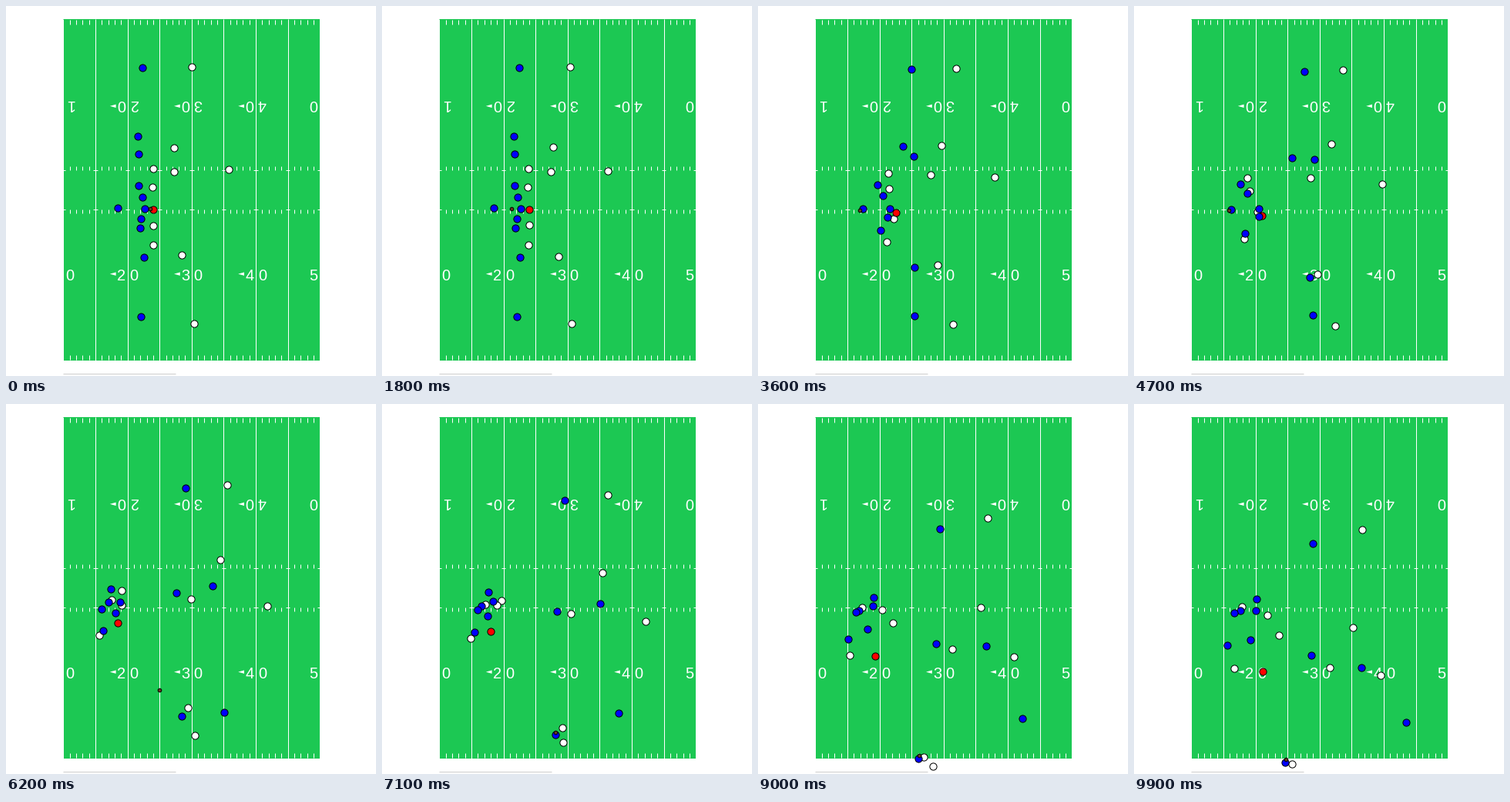
Animation of 480 by 480 pixels, one loop 10000 ms. Source, as a matplotlib script:

```python
import numpy as np
import matplotlib.pyplot as plt
from matplotlib.animation import FuncAnimation
from matplotlib.patches import Polygon, Rectangle

FRAMES, STEP = 100, 100
PT = 0.9                       # points per pixel at 80 dpi
LEFT, RIGHT, TOP, BOTTOM = 74.4, 407.2, 17, 460
YARD = (RIGHT - LEFT) / 40
SNAP, TAKEN, BREAK, THROW, CATCH, MID, END = 1.6, 2.1, 4.7, 5.4, 6.5, 7.2, 9.9

# Key points of each run: line-up, BREAK, MID, END
OFFENSE = np.array([
    [(177, 79.5), (221, 84.5), (237, 127), (231.5, 180.5)],
    [(171, 168.5), (204.5, 196.5), (227.5, 272), (229.5, 325.5)],
    [(171.5, 192), (233.5, 199), (284, 262), (295, 342)],
    [(172, 233), (138, 230.5), (138, 244.5), (159, 252.5)],
    [(176.5, 248), (147, 243), (129, 263), (137.5, 267.5)],
    [(180, 262.5), (161.5, 262.5), (144, 256), (157.5, 267.5)],
    [(175, 276), (161.5, 272.5), (137, 275.5), (151, 305.5)],
    [(173.5, 288), (143.5, 295), (119, 296), (120.5, 312.5)],
    [(174.5, 403), (232, 400.5), (309.5, 401.5), (352.5, 412.5)],
    [(145, 262), (126, 263.5), (124, 267.5), (130, 271)],      # passer
    [(178.5, 325.5), (227.5, 352), (224, 431.5), (196, 464.5)],  # catcher
])
BACKS = np.array([
    [(240.5, 78.5), (271, 83), (294, 120), (296, 163)],
    [(217.5, 183.5), (255.5, 178.5), (287, 221.5), (283.5, 289.5)],
    [(217.5, 214.5), (229, 223), (245.5, 274.5), (253.5, 341.5)],
    [(289, 212), (322, 230.5), (342, 284), (319.5, 352)],
    [(228, 322.5), (238, 347.5), (233.5, 423), (223.5, 491.5)],
    [(244, 411.5), (261, 415), (234, 440), (205, 466.5)],
])
RUSH = np.array([
    [(191, 211), (146.5, 223), (156, 256), (187.5, 299.5)],
    [(190, 235), (149.5, 239.5), (133.5, 260.5), (139.5, 263)],
    [(191, 284.5), (160, 267), (149.5, 261), (172.5, 274)],
    [(190.5, 310), (143, 301.5), (114.5, 304.5), (129.5, 342.5)],
    [(191, 264), (166, 272), (141, 296.5), (167, 346.5)],      # red
])

fig = plt.figure(figsize=(6, 6), dpi=80, facecolor="white")
ax = fig.add_axes([0, 0, 1, 1])
ax.set(xlim=(0, 480), ylim=(480, 0))
ax.axis("off")


def vlines(xs, y0, y1):
    ax.vlines(xs, y0, y1, colors="white", lw=PT, zorder=2)


def digit(char, x, y, turned=False):
    ax.text(x, y, char, color="white", fontsize=20 * PT, family="Liberation Sans",
            ha="center", va="baseline", rotation=180 if turned else 0,
            rotation_mode="anchor", zorder=2)


def arrow(x, y):
    ax.add_patch(Polygon([(x - 22.8, y), (x - 15, y - 2.2), (x - 15, y + 2.2)],
                         color="white", lw=0, zorder=2))


def draw_field():
    ax.add_patch(Rectangle((LEFT, TOP), RIGHT - LEFT, BOTTOM - TOP,
                           color="#1cc853", lw=0, zorder=1))
    upper, lower = TOP + 23.58 * YARD, BOTTOM - 23.58 * YARD
    major = LEFT + 5 * YARD * np.arange(9)
    vlines(major, TOP, BOTTOM)
    minor = [LEFT + YARD * k for k in range(1, 40) if k % 5]
    for y0, y1 in ((TOP + 1, TOP + 7), (upper - 5.5, upper),
                   (lower, lower + 5.5), (BOTTOM - 7, BOTTOM - 1)):
        vlines(minor, y0, y1)
    for y in (upper, lower):
        ax.hlines([y] * 9, np.maximum(major - 2.8, LEFT), np.minimum(major + 2.8, RIGHT),
                  colors="white", lw=PT, zorder=2)
    for n, x in zip(range(1, 6), major[::2]):
        if n > 1:
            digit(str(n), x - YARD, 356)
            digit("0", x - YARD, 121.5, True)
        if n < 5:
            digit("0", x + YARD, 356)
            digit(str(n), x + YARD, 121.5, True)
        if 1 < n < 5:
            arrow(x, 347.6)
            arrow(x, 129.8)
    ax.hlines(477, LEFT, 220, colors="#cccccc", lw=PT, zorder=2)


def run(keys, t, start=SNAP, power=1.6):
    """Positions of a group: ease off the line, then a parabola through three keys."""
    home, brk, mid, end = keys.swapaxes(0, 1)
    if t < BREAK:
        u = max(0, (t - start) / (BREAK - start))
        return home + (brk - home) * u ** power
    d1 = (mid - brk) / (MID - BREAK)
    d2 = (end - mid) / (END - MID)
    bend = (d2 - d1) / (END - BREAK)
    return brk + (t - BREAK) * (d1 + bend * (t - MID))


def held(t):
    passer, catcher = run(OFFENSE[-2:], t)
    return passer + (-3.2, 1.8) if t <= THROW else catcher + (0.5, -3.5)


def ball_at(t):
    spot = np.array([186.5, 263])
    for t0, t1, a in ((SNAP, TAKEN, spot), (THROW, CATCH, held(THROW))):
        if t0 < t < t1:
            return a + (t - t0) / (t1 - t0) * (held(t1) - a)
    return spot if t <= SNAP else held(t)


def dots(color, size, z):
    d = ax.scatter([], [], s=(size * PT) ** 2, c=color, edgecolors="black",
                   linewidths=PT, zorder=z)
    d.set_clip_path(Rectangle((0, 0), 480, 478, transform=ax.transData))
    return d


draw_field()
white_dots = dots("white", 9.2, 3)
red_dot = dots("red", 9.2, 4)
blue_dots = dots("blue", 9.2, 5)
ball_dot = dots("#6b3a1e", 4.6, 6)


def draw(i):
    t = i * STEP / 1000
    rush = run(RUSH, t)
    # Backs drift from the start instead of waiting for the snap
    white_dots.set_offsets(np.vstack([run(BACKS, t, 0, 2.33), rush[:-1]]))
    red_dot.set_offsets(rush[-1:])
    blue_dots.set_offsets(run(OFFENSE, t))
    ball_dot.set_offsets([ball_at(t)])
    return white_dots, red_dot, blue_dots, ball_dot


anim = FuncAnimation(fig, draw, frames=FRAMES, interval=STEP, repeat=True, repeat_delay=0)
plt.show()
```
